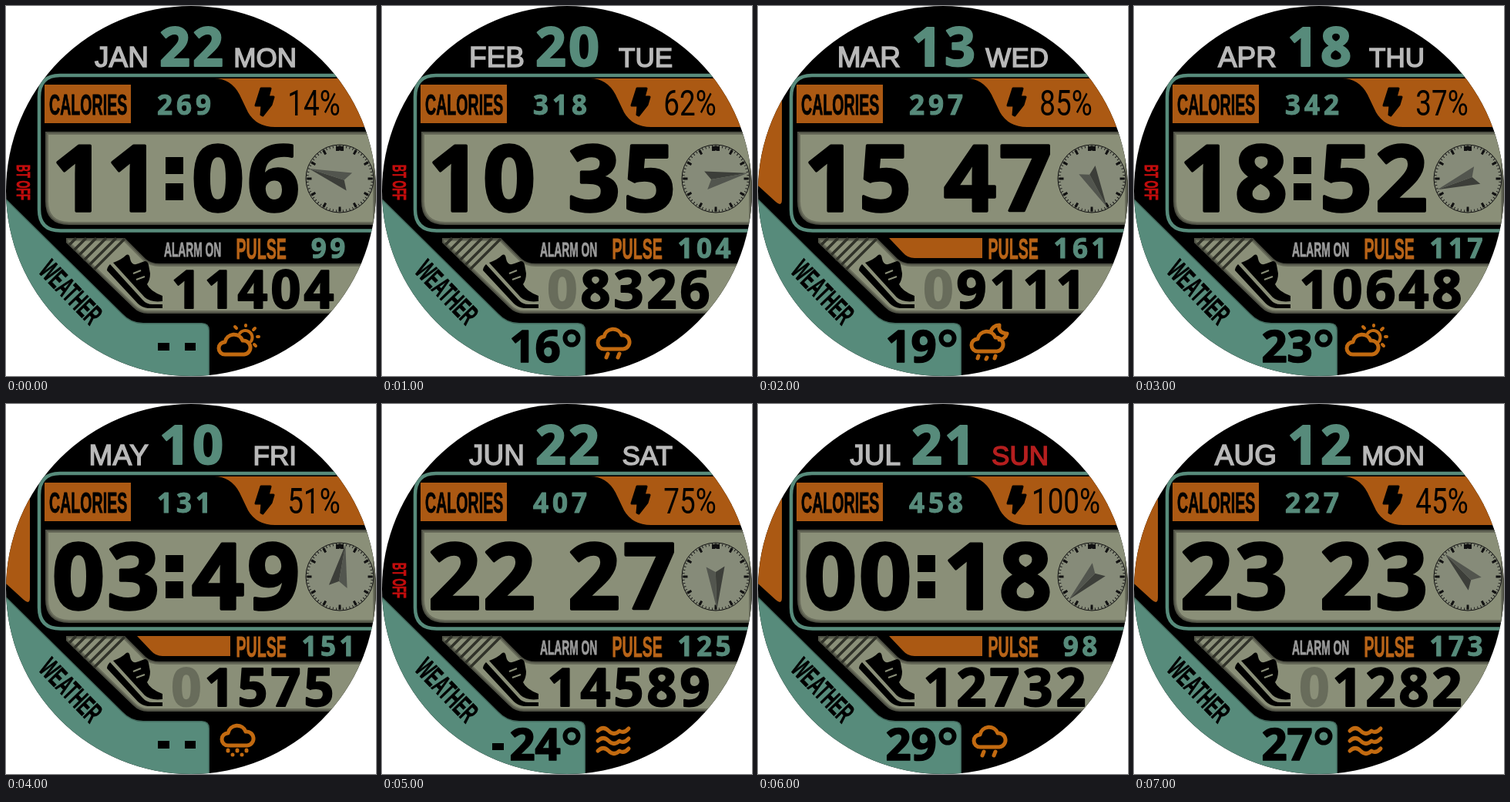
Write an HTML page that moves like this. It is 480 px wide and 480 px high and loops after 8000 ms.

```html
<!DOCTYPE html>
<html lang="en">
<head>
<meta charset="utf-8">
<title>Watch face</title>
<style>
html, body { margin: 0; width: 100%; height: 100%; overflow: hidden; background: #fff; }
svg { display: block; width: 480px; height: 480px; --orange: #ab5913; --teal: #578b7b; --panel: #8a8f78; }
.digits { font-family: "Open Sans", sans-serif; font-weight: 700; text-anchor: middle; stroke-linejoin: round; }
.narrow { font-family: "Liberation Sans", Arial, sans-serif; font-weight: 700; vector-effect: non-scaling-stroke; }
.date { font-family: "Liberation Sans", Arial, sans-serif; text-anchor: end; stroke-width: 1.5; }
.battery { font: 46px Roboto, sans-serif; text-anchor: middle; }
.icon { fill: none; stroke: #c26a10; stroke-width: 5; stroke-linecap: round; stroke-linejoin: round; }
.shade { fill: none; stroke: #000; stroke-opacity: .25; }
</style>
</head>
<body>
<svg viewBox="0 0 480 480">
  <defs>
    <clipPath id="face"><circle cx="240" cy="240" r="240"/></clipPath>
    <path id="timePanel" d="M51 163H480V284H82Q51 284 51 253Z"/>
    <path id="stepPanel" d="M78 301H154L181 328Q188 334 199 334H480V399H184Q173 399 165 391L78 307Z"/>
    <path id="cloud" d="M288 445a8 8 0 0 1 0-16a12 12 0 0 1 23-2a9 9 0 0 1 2 18z"/>
  </defs>
  <g clip-path="url(#face)">
    <rect width="480" height="480"/>
    <path d="M490 90H70Q43 90 43 118V264Q43 291.500 71 291.500H490" fill="none" stroke="var(--teal)" stroke-width="4.500"/>
    <path d="M50 102H162V152H50Z" fill="var(--orange)"/>
    <path d="M270 94H480V157H349Q325 157 314 138L303 115Q292 94 270 94Z" fill="var(--orange)"/>
    <path d="M331 107H343L340 118H347L344 128L333 142L331 141L332 129H324Z" stroke="#000" stroke-width="3" stroke-linejoin="round"/>
    <g fill="var(--panel)"><use href="#timePanel"/><use href="#stepPanel"/></g>
    <g class="shade">
      <g stroke-width="8"><use href="#timePanel"/><use href="#stepPanel"/></g>
      <g stroke-width="4"><use href="#timePanel"/><use href="#stepPanel"/></g>
    </g>
    <path d="M82 310L91 301M88 317L104 301M95 323L117 301M101 330L130 301M108 336L143 301M114 342L154 302" stroke="#303229" stroke-width="3.500"/>
    <path d="M0 250L151 399Q162 411 178 411H254Q264 411 264 421V480H0Z" fill="var(--teal)"/>
    <path d="M0 250L151 399Q162 411 178 411H254Q264 411 264 421V480" class="shade" stroke-width="3"/>
    <path d="M139 333Q150 329 156 323Q160 321 161 328Q163 338 172 334L180 331Q184 331 185 336L187 347Q187 355 183 361Q187 370 203 376V383Q188 385 180 378ZM135 335L177 381Q182 387 190 387H203V392H184Q176 391 171 386L131 343Q131 339 135 335Z"/>
    <path d="M165 347L175 343M169 355L180 351" stroke="var(--panel)" stroke-width="2"/>
    <g transform="translate(433 224)" fill="none" stroke="#111">
      <circle r="44" fill="#868b79"/>
      <circle r="42" stroke-width="3" pathLength="60" stroke-dasharray=".2 .8" stroke-dashoffset=".1"/>
      <circle r="39.500" stroke-width="6" pathLength="12" stroke-dasharray=".15 .85" stroke-dashoffset=".075"/>
      <path d="M-3-42V-36M3-42V-36" stroke-width="4"/>
    </g>
    <g id="live"></g>
  </g>
</svg>
<script>
const ORANGE = 'var(--orange)', TEAL = 'var(--teal)';
const cloud = (dx = 0, dy = 0) => `<use href="#cloud" x="${dx}" y="${dy}"/>`;
const wave = y => `M280 ${y}q7-7 14 0t14 0q6 4 12-3`;
const icons = {
  sun: cloud(-4, 7) + '<path d="M303 425a9 9 0 1 1 15 10M299 418l-2-2M311 415v-1M321 420l2-2M326 429h2M322 439l2 2" stroke-width="4"/>',
  night: cloud(-3, 3) + '<path d="M302 423a11 11 0 0 1 11-9q-2 10 10 11a11 11 0 0 1-10 8M286 454l-1 3M297 456l-1 2M308 454l-1 3"/>',
  snow: cloud(0, -2) + '<path d="M288 449v1M294 455v.1M300 449v1M306 455v.1M312 449v1"/>',
  rain: cloud() + '<path d="M293 451l-2 5M308 451l-2 5"/>',
  fog: `<path d="${wave(424)}${wave(437)}${wave(450)}"/>`
};

const keys = ['month', 'day', 'weekday', 'time', 'colon', 'calories', 'battery', 'pulse', 'steps', 'temp', 'icon', 'linked', 'alarm', 'angle'];
const states = [
  ['JAN', '22', 'MON', '1106', 1, '269', 14, '99', '11404', '', 'sun', 0, 1, 288],
  ['FEB', '20', 'TUE', '1035', 0, '318', 62, '104', '08326', '16', 'rain', 0, 1, 80],
  ['MAR', '13', 'WED', '1547', 0, '297', 85, '161', '09111', '19', 'night', 1, 0, 152],
  ['APR', '18', 'THU', '1852', 1, '342', 37, '117', '10648', '23', 'sun', 0, 1, 250],
  ['MAY', '10', 'FRI', '0349', 1, '131', 51, '151', '01575', '', 'snow', 1, 0, 10],
  ['JUN', '22', 'SAT', '2227', 0, '407', 75, '125', '14589', '-24', 'fog', 0, 1, 178],
  ['JUL', '21', 'SUN', '0018', 1, '458', 100, '98', '12732', '29', 'rain', 1, 0, 225],
  ['AUG', '12', 'MON', '2323', 0, '227', 45, '173', '01282', '27', 'fog', 1, 1, 315]
].map(row => Object.fromEntries(row.map((value, i) => [keys[i], value])));

const digits = (text, xs, y, size, color = '#000') =>
  `<text class="digits" x="${xs.join(' ')}" y="${y}" font-size="${size}" fill="${color}" stroke="${color}" stroke-width="${size * .03}">${text}</text>`;
const label = (text, x, y, size, color, turn = 0) =>
  `<text class="narrow" transform="translate(${x} ${y}) rotate(${turn}) scale(.53 1)" font-size="${size}" fill="${color}" stroke="${color}" stroke-width=".7">${text}</text>`;
const date = (text, x, size) => {
  const color = text === 'SUN' ? '#b51f1f' : '#b9b9b9';
  return `<text class="date" x="${x}" y="78.5" font-size="${size}" fill="${color}" stroke="${color}">${text}</text>`;
};
const row = (count, center, pitch) => Array.from({ length: count }, (_, i) => center + (i - (count - 1) / 2) * pitch);

function steps(text) {
  const xs = row(5, 320, 43), lead = text[0] === '0';
  return lead
    ? digits('0', [xs[0]], 392, 68, '#686c5b') + digits(text.slice(1), xs.slice(1), 392, 68)
    : digits(text, xs, 392, 68);
}

function temperature(text) {
  if (!text) return '<path d="M197 437h15v10h-15zM232 437h14v10h-14z"/>';
  return (text[0] === '-' ? '<path d="M143 440h15v9h-15z"/>' : '') +
    digits(text.replace('-', ''), [182, 215], 462, 58) +
    '<circle cx="246" cy="431" r="8.5" fill="none" stroke="#000" stroke-width="6"/>';
}

const render = s => [
  date(s.month, 185, 37), date(s.weekday, 377, 35),
  digits(s.day, [219, 262], 78, 70, TEAL),
  label('CALORIES', 56, 141, 37, '#000'),
  digits(s.calories, row(3, 231, 25), 140.5, 35, TEAL),
  `<text class="battery" transform="translate(399.5 141.5) scale(.8 1)">${s.battery}%</text>`,
  digits(s.time, [94, 165, 275, 347], 266, 119),
  s.colon ? '<path d="M207 196h23v22h-23zM207 230h23v22h-23z"/>' : '',
  `<g transform="translate(433 224) rotate(${s.angle})"><path d="M0-42L-12 13L0 6Z" fill="#3c3e39"/><path d="M0-42L12 13L0 6Z" fill="#52554e"/></g>`,
  s.linked
    ? `<path d="M0 100H31V251Q31 261 23 254L0 233Z" fill="${ORANGE}"/>`
    : label('BT OFF', 13.5, 206, 24, '#c40d0d', 90),
  s.alarm
    ? label('ALARM ON', 205, 325, 26, '#9b9b9b')
    : `<path d="M170 301H291V327H203Q194 327 188 320Z" fill="${ORANGE}"/>`,
  label('PULSE', 298.5, 328, 37, '#b86418'),
  digits(s.pulse, row(s.pulse.length, 418, 24.5), 327, 35, TEAL),
  steps(s.steps),
  label('WEATHER', 41, 345, 37, '#000', 46),
  temperature(s.temp),
  `<g class="icon">${icons[s.icon]}</g>`
].join('');

const live = document.getElementById('live');
let shown = -1;
function tick(now) {
  const index = Math.floor(now / 1000) % states.length;
  if (index !== shown) live.innerHTML = render(states[shown = index]);
  requestAnimationFrame(tick);
}
tick(performance.now());
</script>
</body>
</html>
```
